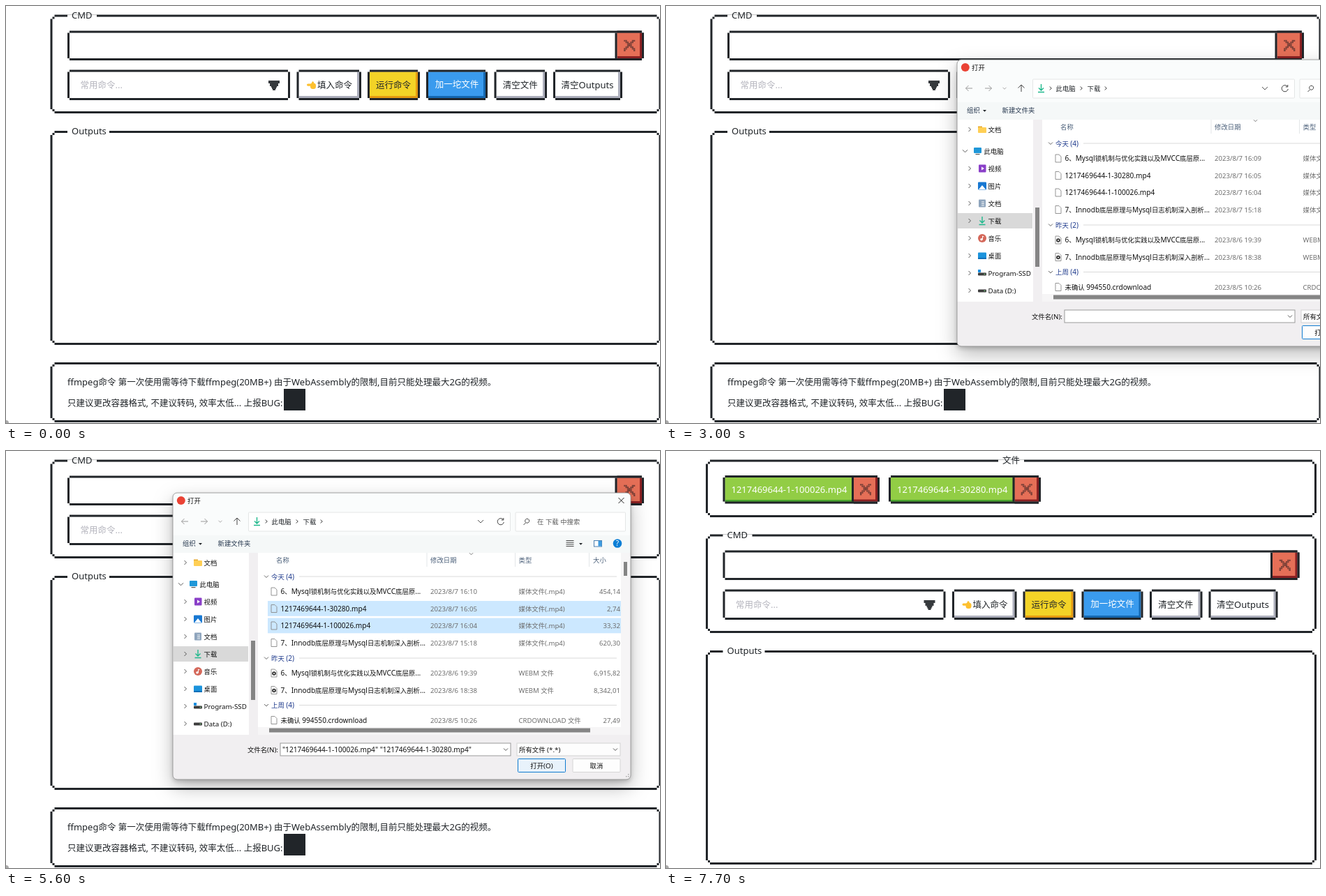
These frames come from a looping animation (937x598 px, 8 s). An HTML page:

```html
<!DOCTYPE html>
<html lang="zh-CN">
<head>
<meta charset="utf-8">
<style>
html, body { margin: 0; width: 100%; height: 100%; overflow: hidden; background: #fff; }
svg { display: block; width: 100vw; height: 100vh; }
text { font-family: "Noto Sans", "Noto Sans CJK SC", "Noto Sans CJK", sans-serif; white-space: pre; }
.pane { filter: drop-shadow(0 3px 3px #0003) drop-shadow(0 11px 14px #0004); }
</style>
</head>
<body>
<svg id="stage" viewBox="0 0 937 598"></svg>
<script>
const LOOP = 8000, INK = '#212529', GREY = '#6d6d6d';
const FILE_A = '1217469644-1-100026.mp4', FILE_B = '1217469644-1-30280.mp4';

// Value of the last key at or before t
const at = (t, keys) => keys.reduce((v, [k, next]) => t >= k ? next : v, keys[0][1]);

const rect = (x, y, w, h, fill, more = '') =>
  `<rect x="${x}" y="${y}" width="${w}" height="${h}" fill="${fill}" ${more}/>`;
const circle = (x, y, r, fill) => `<circle cx="${x}" cy="${y}" r="${r}" fill="${fill}"/>`;
const line = (d, color = '#444', w = 1) => `<path d="${d}" fill="none" stroke="${color}" stroke-width="${w}"/>`;
const shape = (d, fill) => `<path d="${d}" fill="${fill}"/>`;
const text = (x, y, s, size = 13, fill = INK, anchor = 'start') => {
  const cjk = size > 12 ? 12.5 : 9.4;
  const body = s.replace(/[\u2e80-\uffef]+/g, m => `<tspan font-size="${cjk}">${m}</tspan>`);
  return `<text x="${x}" y="${y}" font-size="${size}" fill="${fill}" text-anchor="${anchor}">${body}</text>`;
};
const right = (x, y, c = '#555', s = 3) => line(`M${x - s / 2} ${y - s}l${s} ${s}l${-s} ${s}`, c);
const down = (x, y, c = '#555', s = 3.5) => line(`M${x - s} ${y - s / 2}l${s} ${s}l${s} ${-s}`, c);

// ---- pixel-style page ----
function edge(x, y, r, b, k = 3) {
  const w = r - x - 2 * k, h = b - y - 2 * k;
  let s = rect(x + k, y, w, 3, INK) + rect(x + k, b - 3, w, 3, INK) +
          rect(x, y + k, 3, h, INK) + rect(r - 3, y + k, 3, h, INK);
  if (k > 3) for (const cx of [x + 3, r - 6]) for (const cy of [y + 3, b - 6]) s += rect(cx, cy, 3, 3, INK);
  return s;
}

function face(x, y, r, b, fill, shade, state) {
  const w = r - x - 6, h = b - y - 6, d = state == 'hover' ? 4.7 : 3, o = state == 'down' ? 3 : 0;
  return rect(x + 3, y + 3, w, h, shade) + rect(x + 3 + o, y + 3 + o, w - d, h - d, fill) + edge(x, y, r, b);
}

const box = (x, y, r, b, label, lx, gap) =>
  edge(x, y, r, b, 6) + (label ? rect(lx - 6, y, gap, 3.5, '#fff') + text(lx, y + 5.3, label) : '');

function closeButton(x, y, r, b) {
  const c = 2.3, x0 = (x + r) / 2 - 8, y0 = (y + b) / 2 - 8;
  let s = face(x, y, r, b, '#e56f57', '#8c2022');
  for (let i = 0; i < 7; i++)
    for (const j of [i, 6 - i, Math.min(i + 1, 6), Math.max(5 - i, 0)])
      s += rect(x0 + j * c, y0 + i * c, 2.2, 2.2, '#7d4138');
  return s;
}

function button(x, r, label, fill, hoverFill, shade, color, state, tx = (x + r) / 2 - .5, ty = 118) {
  return face(x, 91.5, r, 135, state ? hoverFill : fill, shade, state) + text(tx, ty, label, 13, color, 'middle');
}

function page(t) {
  const moved = t >= 6200;
  const fill = at(t, [[0, ''], [7400, 'hover'], [7700, '']]);
  const run = at(t, [[0, ''], [500, 'hover'], [900, ''], [7200, 'hover'], [7300, '']]);
  const add = at(t, [[0, ''], [900, 'hover'], [1000, 'down'], [1100, 'hover'], [6200, ''],
    [6600, 'hover'], [6700, ''], [7000, 'hover'], [7200, '']]);
  const plain = ['#fff', '#e7e7e7', '#adafbc', INK];
  let s = box(63.5, 12.5, 938.5, 154, 'CMD', 94, 42) + box(63.5, 179, 938.5, 486, 'Outputs', 94, 60);
  s += edge(88, 35.5, 914, 78) + closeButton(872.5, 35.5, 914, 78);
  s += edge(88, 91.5, 407, 135) + text(106.5, 118, '常用命令...', 13, '#b4b4bd');
  [8, 8, 6, 6, 4, 3, 2].forEach((w, i) => s += rect(384 - w, 107 + i * 2, w * 2, 1.8, INK));
  s += button(416.5, 509, '填入命令', ...plain, fill, 471);
  s += rect(431, 111.5, 8, 3.2, '#fdc02f', 'rx="1.6"') + rect(436, 110.5, 8, 8.5, '#fdc02f', 'rx="3.5"') +
       shape('M437 112l2-4l2 1l0 4z', '#fdc02f');
  s += button(518, 593, '运行命令', '#f3d327', '#eec51c', '#e59a10', INK, run);
  s += button(602, 690, '加一坨文件', '#3a9bee', '#3087de', '#1467b0', '#fff', add, 646, 117);
  s += button(699.5, 775, '清空文件', ...plain, '') + button(784, 883, '清空Outputs', ...plain, '');
  if (!moved) {
    s += box(63.5, 511, 938.5, 597);
    s += text(88, 543.7, 'ffmpeg命令 第一次使用需等待下载ffmpeg(20MB+) 由于WebAssembly的限制,目前只能处理最大2G的视频。');
    s += text(88, 573.7, '只建议更改容器格式, 不建议转码, 效率太低... 上报BUG:') + rect(398, 549, 31, 31, INK);
  }
  s = `<g transform="translate(${moved ? '-6.5 107' : '0 0'})">${s}</g>`;
  if (moved) s += box(57, 12.5, 932, 95, '文件', 482, 37) + chip(81.5, 266, 306, FILE_A) + chip(319, 496.5, 537, FILE_B);
  return s + shape('M0 594q4 0 4 4H0z', '#aaa');
}

function chip(x, mid, r, name) {
  return rect(x + 3, 38, mid - x, 35, '#4aa52e') + rect(x + 3, 38, mid - x, 32, '#92cd45') +
    edge(x, 35, r, 75.5) + closeButton(mid, 35, r, 75.5) + text(x + 12, 59.7, name, 13, '#fff');
}

// ---- file dialog ----
const download = (x, y) => line(`M${x} ${y - 6}v9m-3.5 -3.5l3.5 3.5l3.5 -3.5M${x - 4.5} ${y + 5.5}h9`, '#1fb88c', 1.4);
const sheet = (x, y) => line(`M${x - 4} ${y - 5.5}h5l3 3v8h-8z`, '#8a8a8a', .9);
const drive = y => rect(269, y - 1.5, 12, 4, '#3c3c3c', 'rx="1"') + rect(277.5, y, 2, 1, '#7fe08a');
const icons = {
  folder: y => rect(269, y - 4.5, 6, 4, '#e8a92c') + rect(269, y - 3, 12, 8, '#ffcf55', 'rx="1"'),
  pc: y => rect(263, y - 5, 11, 8, '#1f97d8', 'rx="1"') + rect(265.5, y + 4, 6, 1.2, '#555'),
  video: y => rect(270, y - 5.5, 10.5, 11, '#8a3fc8', 'rx="1"') + shape(`M274 ${y - 2.5}l4 2.5l-4 2.5z`, '#fff'),
  image: y => rect(269, y - 5.5, 12, 11, '#1878d2', 'rx="1"') + shape(`M270 ${y + 5}l5 -6l5 6z`, '#fff'),
  doc: y => rect(270, y - 5.5, 10, 11, '#8fa5bd', 'rx="1"') + line(`M274 ${y - 2}h4m-4 2.5h4m-4 2.5h4`, '#fff', .9),
  down: y => download(275, y),
  music: y => circle(275, y, 6, '#d4685a') + circle(274, y + 1.8, 1.7, '#fff') + line(`M275.5 ${y + 2}v-5l2 1`, '#fff'),
  desk: y => rect(269, y - 4.5, 12, 9.5, '#1b93dc', 'rx="1"') + rect(269, y + 3, 12, 2, '#1270b8'),
  system: y => rect(269, y - 5, 4, 4, '#1b8fe0') + drive(y + 1),
  drive
};
const places = [[160, '文档', 'folder'], [191, '此电脑', 'pc'], [216, '视频', 'video'], [241, '图片', 'image'],
  [266, '文档', 'doc'], [291, '下载', 'down'], [316, '音乐', 'music'], [341, '桌面', 'desk'],
  [366, 'Program-SSD', 'system'], [391, 'Data (D:)', 'drive']];

const LOCKS = '6、Mysql锁机制与优化实践以及MVCC底层原...', LOGS = '7、Innodb底层原理与Mysql日志机制深入剖析...';
const MP4 = '媒体文件(.mp4)', WEBM = 'WEBM 文件';
const files = [[201.5, LOCKS, '', MP4, '454,14'], [226, FILE_B, '7 16:05', MP4, '2,74'],
  [250.5, FILE_A, '7 16:04', MP4, '33,32'], [275, LOGS, '7 15:18', MP4, '620,30'],
  [318.5, LOCKS, '6 19:39', WEBM, '6,915,82'], [343, LOGS, '6 18:38', WEBM, '8,342,01'],
  [386, '未确认 994550.crdownload', '5 10:26', 'CRDOWNLOAD 文件', '27,49']];

function sidebar(ready) {
  let s = rect(239.5, 146, 108.5, 261, '#fff') + rect(348, 146, 13, 261, '#f1eff1');
  s += rect(351, 272, 6, 85, '#858585') + rect(240, 280, 107, 22, '#d9d9d9');
  for (const [y, name, icon] of places) {
    const pc = icon == 'pc', disk = icon == 'system' || icon == 'drive';
    s += pc ? down(250.5, y) : right(257, y);
    s += disk && !ready ? sheet(275, y) : icons[icon](y);
    s += text(pc ? 277.5 : 283.5, y + 3.6, name, 9.8, '#111');
  }
  return s;
}

function fileList(t) {
  const hover = at(t, [[0, -1], [3200, 0], [3300, 1], [3700, 2], [4000, -1]]);
  let s = '';
  files.forEach(([y, name, date, type, size], i) => {
    const picked = i == 1 && t >= 3500 || i == 2 && t >= 3900;
    if (picked || i == hover) s += rect(375, y - 11, 506, 21.8, picked ? '#cce8ff' : '#e5f3ff');
    s += sheet(384, y) + (type == WEBM ? circle(384, y + .5, 2.8, '#333') + circle(384, y + .5, 1, '#fff') : '');
    s += text(393.5, y + 3.6, name, 10.1, '#111');
    s += text(608, y + 3.6, '2023/8/' + (date || (t < 4600 ? '7 16:09' : '7 16:10')), 9.6, GREY);
    s += text(734.5, y + 3.6, type, 9.6, GREY) + text(880, y + 3.6, size, 9.6, GREY, 'end');
  });
  for (const [y, name] of [[180, '今天 (4)'], [297, '昨天 (2)'], [364.5, '上周 (4)']])
    s += down(373, y, '#666', 3) + text(380, y + 3.6, name, 10, '#1e3a8c') + line(`M420 ${y}H875`, '#dadada');
  return s;
}

function toolbar(crumbs) {
  const box = 'stroke="#e4e6e6" rx="1"';
  let s = line('M261 101h-9.5m4 -4l-4 4l4 4M279 101h9.5m-4 -4l4 4l-4 4', '#999') + down(307, 101, '#aaa', 2.5);
  s += line('M331 106v-10m-4.5 4.5l4.5 -4.5l4.5 4.5') + rect(347.5, 88, 375, 27, '#fff', box) + rect(730, 88, 157.5, 27, '#fff', box);
  s += download(359.5, 101);
  if (crumbs) s += right(373, 101, '#333', 2.5) + text(380.5, 104.6, '此电脑', 9.8) + right(417, 101, '#333', 2.5) +
    text(425.5, 104.6, '下载', 9.8) + right(452, 101, '#333', 2.5);
  s += down(680, 101, '#555', 4) + line('M712.5 98.5a4.6 4.6 0 1 0 .8 3.5m-.5 -6v3h-3');
  s += line('M745 102.5l-3.5 3.5M744.7 102.5a3 3 0 1 1 .6 .4') + text(761, 104.6, '在 下载 中搜索', 9.6, '#5c5c5c');
  s += text(253, 136.4, '组织', 9.8, '#27384f') + shape('M276 132h5l-2.5 2.7z', INK) + text(303.5, 136.4, '新建文件夹', 9.8, '#27384f');
  s += line('M802.5 128.5h11m-11 2.7h11m-11 2.7h11m-11 2.7h11') + shape('M821 132h5l-2.5 2.7z', INK);
  s += rect(842.5, 128.5, 11, 8.5, '#fff', 'stroke="#4a7fb0"') + rect(848.5, 129, 5, 7.5, '#3d9be0');
  return s + circle(876, 132.5, 6.3, '#0d7fd6') + text(876, 136.2, '?', 10, '#fff', 'middle');
}

function footer(t, ready) {
  let s = rect(393, 419, 330, 18, '#fff', ready ? 'stroke="#9a9a9a"' : '') + text(390, 431.5, '文件名(N):', 9.8, '#111', 'end');
  s += rect(732, 419, 148, 18, '#fdfdfd', ready ? 'stroke="#d3d3d3"' : '');
  const press = at(t, [[0, '#fdfdfd'], [5600, '#e8f2fb'], [5700, '#cce4f7']]);
  s += rect(733.5, 441.5, 68, 19, press, ready ? 'stroke="#0f7bd0" rx="1"' : '');
  s += rect(812, 441.5, 68, 19, '#fdfdfd', ready ? 'stroke="#d6d6d6" rx="1"' : '');
  if (!ready) return s;
  s += down(716, 428, '#555', 3) + down(873, 428, '#555', 3) + text(735, 431.5, '所有文件 (*.*)', 9.8, '#111');
  s += text(767.5, 454.6, '打开(O)', 9.8, '#111', 'middle') + text(846, 454.6, '取消', 9.8, '#111', 'middle');
  for (const [x, y] of [[891, 463], [891, 466], [888, 466]]) s += rect(x, y, 1.5, 1.5, '#aaa');
  return s + text(396, 431.6, at(t, [[0, ''], [3500, FILE_B], [3900, `"${FILE_A}" "${FILE_B}"`]]), 10.1, '#111');
}

function dialog(t) {
  if (t < 2300 || t >= 6000) return '';
  const [dx, dy] = at(t, [[0, [178, 17]], [4800, [38, 7]], [4900, [19, 3.5]], [5000, [7, 1.5]], [5100, [0, 0]]]);
  const scale = at(t, [[0, .96], [2400, .993], [2500, 1], [5800, .975], [5900, .94]]);
  const alpha = at(t, [[0, .5], [2400, 1], [5800, .55], [5900, .12]]);
  const ready = t >= 2600, loaded = t >= 2800;
  let s = rect(239, 60, 656, 411, '#f1eff1', 'rx="6" class="pane"');
  s += shape('M239 146V66a6 6 0 0 1 6-6H889a6 6 0 0 1 6 6V146z', '#fafcfc') + rect(239, 121, 656, 25, '#f5f8f8');
  s += circle(250.8, 71, 6, '#ea4335') + text(260, 74.6, '打开', 9.8, '#111') + line('M877.5 67l8 8m0 -8l-8 8', '#222');
  if (t >= 2500) s += toolbar(loaded);
  s += sidebar(ready) + rect(361, 146, 520, 250, '#fff') + rect(881, 146, 13.5, 261, '#f6f5f6');
  s += at(t, [[0, ''], [4200, rect(364, 145, 239, 21, '#d9ebf9')], [4300, '']]);
  for (const x of [603, 729.5, 835.5]) s += line(`M${x} 146v20`, '#e3e6e8');
  s += down(666.5, 147.5, '#777', 2.5);
  [[387, '名称'], [608, '修改日期'], [734.5, '类型'], [841, '大小']].forEach(([x, n]) => s += text(x, 159.6, n, 9.8, '#4c607a'));
  s += loaded ? fileList(t) + rect(885, 159, 5, 20, '#858585') : text(607, 188.6, '正在处理...', 9.6, GREY);
  s += rect(361, 396, 520, 11, '#f6f5f6') + rect(377, 397.5, 460, 6, '#858585') + footer(t, ready);
  s += rect(239, 60, 656, 411, 'none', 'rx="6" stroke="#8d8d8d" stroke-width=".8"');
  return `<g opacity="${alpha}" transform="translate(${567 + dx} ${265.5 + dy}) scale(${scale}) translate(-567 -265.5)">${s}</g>`;
}

// All changes fall on tenths of a second
const stage = document.getElementById('stage'), start = performance.now();
let shown = -1;
function tick() {
  const t = Math.floor((performance.now() - start) % LOOP / 100) * 100;
  if (t != shown) stage.innerHTML = page(t) + dialog(t);
  shown = t;
  requestAnimationFrame(tick);
}
tick();
</script>
</body>
</html>
```
